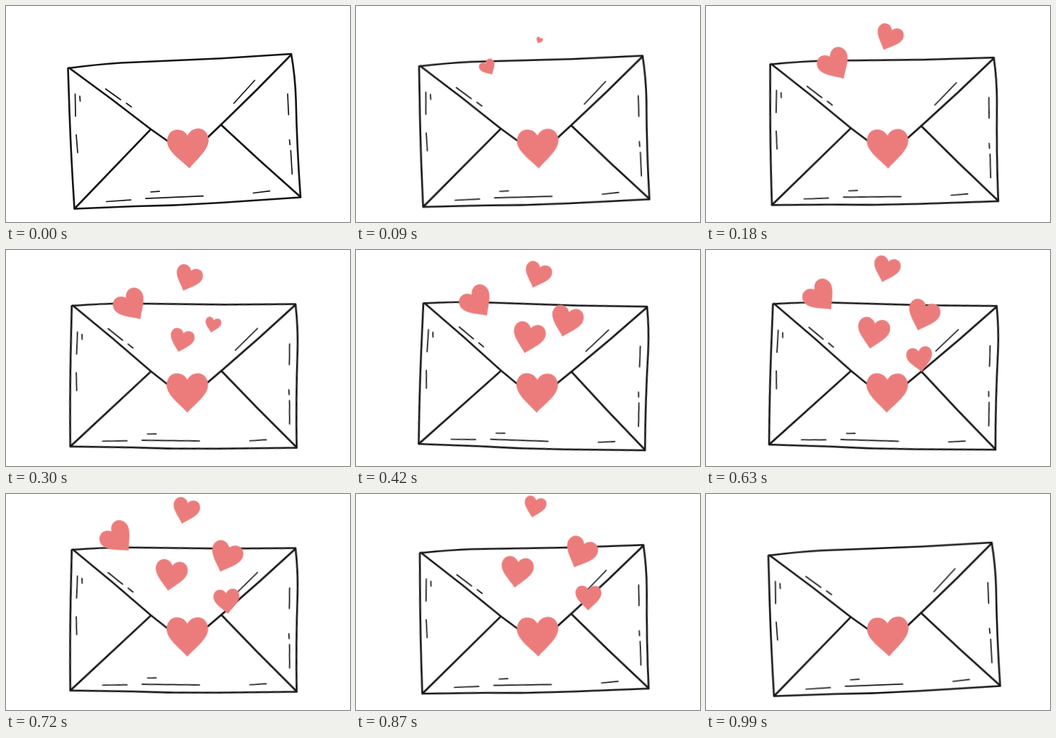
These frames come from a looping animation (480x302 px, 1.02 s). An HTML page:

```html
<!DOCTYPE html>
<html lang="en">
<head>
<meta charset="utf-8">
<title>Love letter</title>
<style>
  html, body { margin: 0; width: 100%; height: 100%; overflow: hidden; background: #fff; }
  svg { display: block; width: 100%; height: 100%; }

  /* 34 ticks of 30 ms; the 1 ms lead keeps ticks clear of rounding */
  .letter, .drift, .pop { animation: 1020ms -1ms infinite; }

  .letter {
    animation-name: rock;
    animation-timing-function: steps(17);
    transform-origin: 248px 176px;
  }
  .ink { fill: none; stroke: #161414; stroke-linecap: round; stroke-linejoin: round; }
  .edge { stroke-width: 2.6; }
  .dash { stroke-width: 1.7; }
  .heart { fill: #ec7c7c; }

  .drift { animation-name: drift; animation-timing-function: steps(34); }
  .pop { animation-timing-function: steps(4); }

  @keyframes rock {
    0%, 100% { transform: rotate(0deg); }
    50% { transform: rotate(5.48deg); }
  }
  @keyframes drift {
    from { transform: translate(var(--x0), var(--y0)) rotate(var(--r0)) scale(var(--s)); }
    to { transform: translate(var(--x1), var(--y1)) rotate(var(--r1)) scale(var(--s)); }
  }

  .a { --x0: 188.5px; --y0: 89.6px; --r0: -28.5deg; --x1: 143.2px; --y1: 51.4px; --r1: -47.4deg; --s: .785; }
  .b { --x0: 256.5px; --y0: 51.5px; --r0: 25deg; --x1: 248px; --y1: 12.5px; --r1: 11.8deg; --s: .648; }
  .c { --x0: 255.6px; --y0: 135.9px; --r0: 19.6deg; --x1: 219.1px; --y1: 104.6px; --r1: 6deg; --s: .777; }
  .d { --x0: 275.7px; --y0: 116.6px; --r0: 7.6deg; --x1: 319.3px; --y1: 76.9px; --r1: 25.9deg; --s: .77; }
  .e { --x0: 230.9px; --y0: 172.7px; --r0: -35deg; --x1: 340.3px; --y1: 140.4px; --r1: 7.5deg; --s: .625; }

  .a .pop { animation-name: popA; }
  .b .pop { animation-name: popB; }
  .c .pop { animation-name: popC; }
  .d .pop { animation-name: popD; }
  .e .pop { animation-name: popE; }

  @keyframes popA {
    0%, 2.941% { transform: scale(0); }
    14.706% { transform: scale(1); }
    70.588% { transform: scale(1); animation-timing-function: steps(2); }
    76.471% { transform: scale(.82); animation-timing-function: steps(3); }
    85.294%, 100% { transform: scale(0); }
  }
  @keyframes popB {
    0%, 5.882% { transform: scale(0); }
    17.647% { transform: scale(1); }
    79.412% { transform: scale(1); animation-timing-function: steps(2); }
    85.294% { transform: scale(.82); animation-timing-function: steps(3); }
    94.118%, 100% { transform: scale(0); }
  }
  @keyframes popC {
    0%, 20.588% { transform: scale(0); }
    32.353% { transform: scale(1); }
    85.294% { transform: scale(1); animation-timing-function: steps(2); }
    91.176% { transform: scale(.82); animation-timing-function: steps(2); }
    97.059%, 100% { transform: scale(0); }
  }
  @keyframes popD {
    0%, 23.529% { transform: scale(0); }
    35.294% { transform: scale(1); }
    85.294% { transform: scale(1); animation-timing-function: steps(2); }
    91.176% { transform: scale(.82); animation-timing-function: steps(2); }
    97.059%, 100% { transform: scale(0); }
  }
  @keyframes popE {
    0%, 41.176% { transform: scale(0); }
    52.941% { transform: scale(1); }
    85.294% { transform: scale(1); animation-timing-function: steps(2); }
    91.176% { transform: scale(.82); animation-timing-function: steps(2); }
    97.059%, 100% { transform: scale(0); }
  }
</style>
</head>
<body>
<svg viewBox="0 0 480 302" preserveAspectRatio="none">
  <defs>
    <path id="heart" class="heart" d="M0-18C-4-25-9-27-15-27C-23-27-29-20-29-10C-28 4-12 15 0 28C12 15 28 4 29-10C29-20 23-27 15-27C9-27 4-25 0-18Z"/>
  </defs>

  <g class="letter">
    <g class="ink edge">
      <path d="M86.5 87Q128 81.5 160 79.5L300 73.3L398 67Q403.5 98 404.5 130Q406 200 411 267.5L300 275Q240 279 180 280L95.5 283.5Q91 215 88.8 155Z"/>
      <path d="M88 86.5L147 130L202 172.3L228 190.5M398 68L350 117L300 166L278 187"/>
      <path d="M202 172.3L96 283M300 166L354 216L411 267"/>
    </g>
    <path class="ink dash" d="M139 116L160 131M168 136L175 141M347 104L318 136
      M96.5 123L97 154M103 126L103.5 133M98 180L100 205
      M393 123L394.3 152M395.5 187L396.3 194M397.3 202L399.3 235
      M140 273.5L174 271.2M202 260L214 259.2M195 269.2L275 265.7M345 261.5L368 258.7"/>
    <use href="#heart" transform="translate(254.4 199) rotate(-3.4)"/>
  </g>

  <g class="drift a"><g class="pop"><use href="#heart"/></g></g>
  <g class="drift b"><g class="pop"><use href="#heart"/></g></g>
  <g class="drift c"><g class="pop"><use href="#heart"/></g></g>
  <g class="drift d"><g class="pop"><use href="#heart"/></g></g>
  <g class="drift e"><g class="pop"><use href="#heart"/></g></g>
</svg>
</body>
</html>
```
